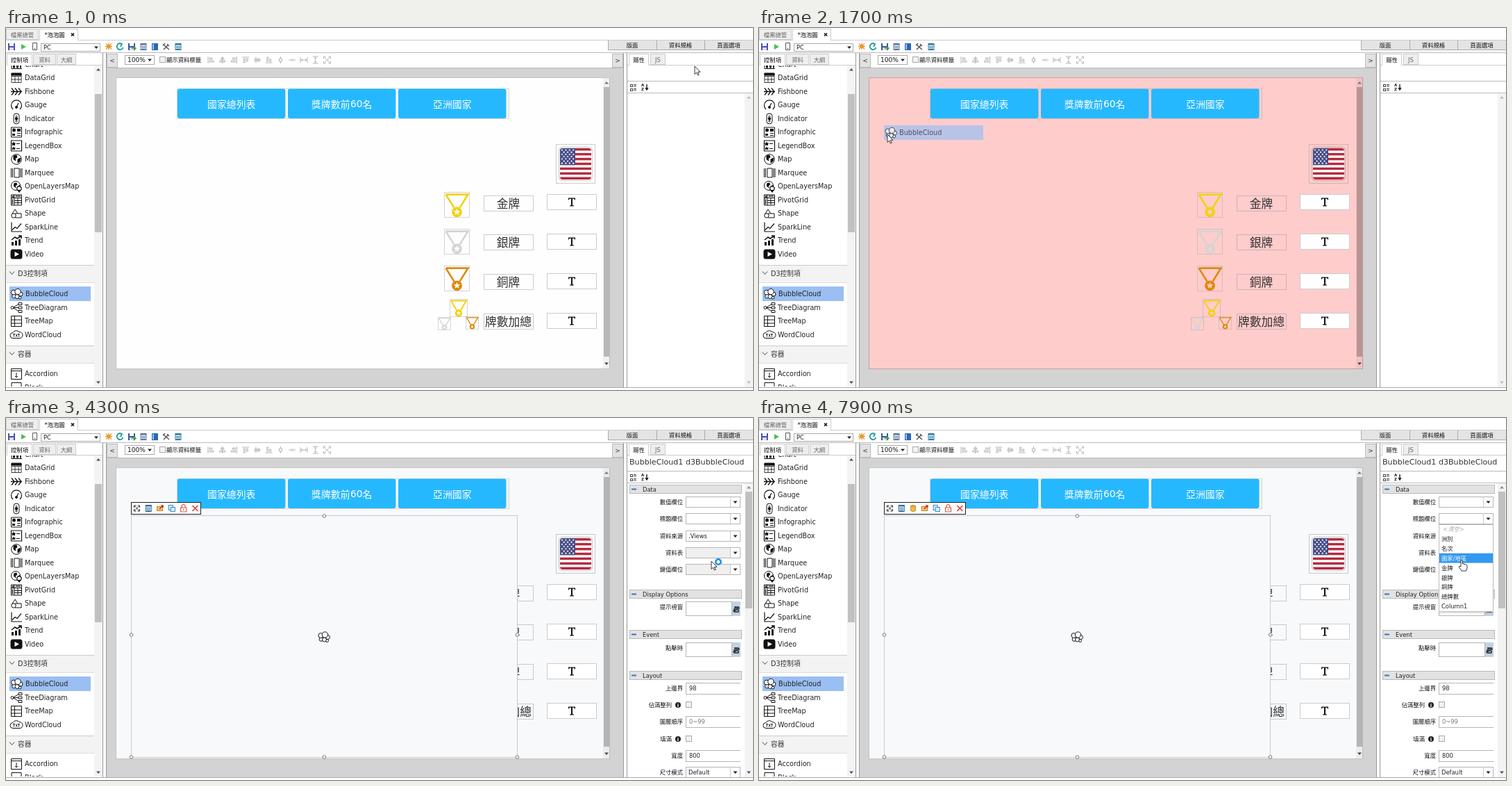
Write an HTML page with a canvas that moves like this. It is 1076x521 px and loops after 8000 ms.

```html
<!DOCTYPE html>
<html lang="zh-Hant">
<head>
<meta charset="utf-8">
<style>
html, body { margin: 0; width: 100%; height: 100%; overflow: hidden; background: #fff; }
canvas { display: block; }
</style>
</head>
<body>
<canvas id="stage" width="1076" height="521"></canvas>
<script>
const c = document.getElementById('stage').getContext('2d');
const LOOP = 8000, STEP = 100, ROW = 13.9;
const SANS = '"DejaVu Sans", "Noto Sans CJK TC", sans-serif';
const CJK = '"Noto Sans CJK TC Light", "Noto Sans CJK TC", "Noto Sans CJK JP", sans-serif';
const PALE = '#f8f9fb';

function rect(x, y, w, h, fill, stroke, dash) {
  if (fill) { c.fillStyle = fill; c.fillRect(x, y, w, h); }
  if (stroke) {
    c.strokeStyle = stroke;
    c.lineWidth = 1;
    c.setLineDash(dash || []);
    c.strokeRect(x + .5, y + .5, w - 1, h - 1);
    c.setLineDash([]);
  }
}
const hline = (x, y, w, col) => rect(x, y, w, 1, col);
const vline = (x, y, h, col) => rect(x, y, 1, h, col);

function text(s, x, y, size = 8.35, col = '#222', align = 'left', font = SANS, weight = 'normal') {
  c.font = `${weight} ${size}px ${font}`;
  c.textAlign = align;
  c.fillStyle = col;
  c.fillText(s, x, y + size * .36);
}

function icon(d, x, y, { col = '#111', fill, lw = 1, k = 1 } = {}) {
  const p = new Path2D(d);
  c.save();
  c.translate(x, y);
  c.scale(k, k);
  if (fill) { c.fillStyle = fill; c.fill(p); }
  if (col) { c.strokeStyle = col; c.lineWidth = lw; c.stroke(p); }
  c.restore();
}

const disc = (x, y, r) => `M${x - r} ${y}a${r} ${r} 0 1 0 ${2 * r} 0a${r} ${r} 0 1 0 ${-2 * r} 0`;
const arrow = (x, y, col = '#222', up = 1) => icon(`M-3 ${-1.5 * up}H3L0 ${2 * up}Z`, x, y, { col: null, fill: col });

function starPath(r) {
  let d = '';
  for (let i = 0; i < 10; i++) {
    const a = i * Math.PI / 5 - Math.PI / 2, q = i % 2 ? r * .42 : r;
    d += (i ? 'L' : 'M') + (q * Math.cos(a)).toFixed(2) + ' ' + (q * Math.sin(a)).toFixed(2);
  }
  return d + 'Z';
}

const GLOBE = 'M-4-5L0-6 1-3-2-1-1 2-4 0ZM2 0L6-2 5 3 2 5Z';
const SOLID = { col: null, fill: '#111' };
const glyphs = {
  Chart: [['M-7-6V6H8'], ['M-5 0h3v5h-3zM0-4h3v9h-3zM5-2h2v7h-2z', SOLID]],
  DataGrid: [['M-7-6.5H7V6.5H-7ZM-7-2.5H7M-7 2H7M-2-2V6M3-2V6', { lw: .8 }], ['M-7-7H7V-4H-7Z', { fill: '#111' }]],
  Fishbone: [['M-8 0H8M-7-5l4 5-4 5M-2-5l4 5-4 5M3-5l4 5-4 5', { lw: 1.3 }]],
  Gauge: [['M-5 6A7.5 7.5 0 1 1 5 6M0 3L3-3', { lw: 1.2 }], [disc(0, 3, 1.5), { fill: '#111' }]],
  Indicator: [['M-4-4A4 3.5 0 0 1 4-4V4A4 3.5 0 0 1-4 4Z'], [disc(0, -3, 1.2) + disc(0, 3.5, 1.2), { lw: .8 }], [disc(0, 0, 1.8), { fill: '#111' }]],
  Infographic: [['M-7.5-7H7.5V7H-7.5Z'], [disc(-3.5, -3, 2.5) + 'M1-5H6V-1H1ZM-6 2H-2V5H-6ZM1 1H6V2H1ZM1 4H6V5H1Z', SOLID]],
  LegendBox: [['M-7.5-7.5H7.5V7.5H-7.5ZM0-3H5M0 4H5', { lw: 1.2 }], ['M-4-6l1 2 2 0-1 2 0 2-2-1-2 1 0-2-1-2 2 0ZM-4 1l1 2 2 0-1 2 0 1-2-1-2 1 0-2-1-1 2 0Z', SOLID]],
  Map: [[disc(0, 0, 7.3)], [GLOBE, { fill: '#111' }]],
  Marquee: [['M-3-6.5H4V6.5H-3ZM-7.5-6.5V6.5M-5.5-6.5V6.5M6-6.5V6.5M8-6.5V6.5']],
  OpenLayersMap: [[disc(-1, -1, 6.5)], [GLOBE, { fill: '#111', k: .85 }], [disc(4, 3, 3.2), { fill: '#fff', lw: 1.3 }], ['M2 5.5L4 8.5 6 5.5Z', { fill: '#111' }]],
  PivotGrid: [['M-7.5-7.5H7.5V7.5H-7.5ZM-7.5-3H7.5M-3-7.5V7.5M-3 1H7M-3 4H7M2-3V7'], ['M-6-6H-4V-4H-6ZM-1-6H6V-5H-1ZM-6-1H-5V6H-6Z', { fill: '#111', lw: .4 }]],
  Shape: [['M-2-6L3 2H-7Z'], ['M-2 0H7V6H-2Z', { fill: '#fff' }], [disc(-4, 3, 3.2), { fill: '#fff' }]],
  SparkLine: [['M-7-7V6.5H8M-6 4L-2 0 1 2 7-5', { lw: 1.2 }]],
  Trend: [['M-7 2h3v5h-3zM-2 0h3v7h-3zM3-2h3v9h-3z', SOLID], ['M-7-1L-2-5 1-3 6-6M3-7H7V-3', { lw: 1.6 }]],
  Video: [['M-6-6.5H6Q8-6.5 8-4V4Q8 6.5 6 6.5H-6Q-8 6.5-8 4V-4Q-8-6.5-6-6.5', { fill: '#111' }], ['M-2.5-3.5L4 0-2.5 3.5Z', { col: null, fill: '#fff' }]],
  BubbleCloud: [
    [disc(-4, 3.5, 2.8), { fill: '#fff' }], [disc(5.5, .5, 3), { fill: '#fff' }], [disc(4.5, 5.5, 2), { fill: '#fff' }],
    [disc(.5, 4, 3), { fill: '#fff' }], [disc(-4.5, -2, 3.5), { fill: '#fff' }], [disc(1.5, -3, 4.2), { fill: '#fff' }]
  ],
  TreeDiagram: [['M-5 0L4-5.5M-5 0H4M-5 0L4 5.5'], [disc(-6, 0, 2) + 'M3-7H8V-4H3ZM3-1.5H8V1.5H3ZM3 4H8V7H3Z', { fill: '#fff' }]],
  TreeMap: [['M-7.5-7.5H7.5V7.5H-7.5ZM-2.5-7.5V7.5M-7.5-2H7.5M-7.5 3H7.5']],
  WordCloud: [['M-5 5A4 4 0 0 1-5-3A5.5 5.5 0 0 1 4-4A4.5 4.5 0 0 1 5 5Z'], ['M-5-1h3m-1.5 0v4M-1-1l2.5 4m0-4l-2.5 4M2-1h3m-1.5 0v4', { lw: .9 }]],
  Accordion: [['M-7.5-7.5H7.5V7.5H-7.5ZM-7.5-4.5H7.5M0-2V5M-2 3L0 5 2 3']],
  Block: [['M-7-7H7V7H-7Z']]
};

function glyph(name, x, y) {
  for (const [d, o] of glyphs[name]) icon(d, x, y, o);
}

function lists(x, y, col) {
  rect(x - 4.5, y - 5, 9, 10, '#fff', col);
  rect(x - 4, y - 4.5, 8, 2, col);
  for (let i = 0; i < 3; i++) hline(x - 3, y - 1 + i * 2, 6, col);
}

function disk(x, y, col) {
  rect(x - 5, y - 5, 10, 10, col);
  rect(x - 3, y - 5, 6, 4, '#fff');
  rect(x - 3, y + 1, 6, 4, '#dde');
}

function tab(s, x, w, y, active, h = 15, mid = x + w / 2) {
  rect(x, y, w, h + (active ? 2 : 1), active ? '#fff' : '#eee', '#ccc');
  if (active) rect(x + 1, y + h - 1, w - 2, 3, '#fff');
  text(s, mid, y + 8.5, 8.35, active ? '#111' : '#666', 'center');
}

function topBar() {
  hline(0, 17, 1076, '#ccc');
  tab('檔案總管', 0, 47, 1, false, 15, 23.5);
  tab('*泡泡圖', 48, 56, 1, true, 15, 70);
  icon('M-2-2L2 2M2-2L-2 2', 96, 9.5, { lw: 1.6 });

  disk(8, 27, '#4a4fb5');
  icon('M-3-4L4 0-3 4Z', 25, 27, { col: null, fill: '#4fbf4f' });
  icon('M-3-5H3V5H-3ZM-1 3H1', 41.5, 26.5, { col: '#555' });
  rect(50, 22, 86, 12, '#fff', '#aaa');
  text('PC', 54, 28);
  arrow(130, 28);
  icon('M-5 0H5M0-5V5M-4-4L4 4M4-4L-4 4', 148, 26.5, { col: '#e59a2c', lw: 1.3 });
  icon(disc(0, 0, 2.8), 148, 26.5, { col: null, fill: '#e59a2c' });
  icon('M3-4A4.5 4.5 0 1 0 4.5 1M-2-5L3-4 1 0', 164, 27, { col: '#159a93', lw: 1.7 });
  disk(181, 27, '#3b579a');
  icon('M-1 2H4M2 0L5 2 2 5', 182, 27, { col: '#39a845', lw: 1.5 });
  lists(198, 27, '#56709a');
  rect(210, 22, 9, 10, '#2c67b5');
  rect(211, 23, 2, 8, '#9cc0ea');
  icon('M-4 4L3-3M-4-3L4 4M1-4L4-1M-5-2L-2-5', 231, 27, { col: '#555', lw: 1.5 });
  lists(248, 27, '#27769f');

  rect(867, 18, 209, 14, '#e4e4e4');
  hline(867, 31, 209, '#aaa');
  for (const x of [867, 937, 1006]) vline(x, 18, 14, '#aaa');
  [['版面', 902], ['資料規格', 971.5], ['頁面選項', 1041]].forEach(([s, x]) =>
    text(s, x, 24.5, 8.35, '#111', 'center', SANS, 500));
  hline(0, 35, 1076, '#bbb');
}

function section(s, y) {
  rect(0, y, 127, 25, '#f3f3f3');
  hline(0, y, 127, '#ccc');
  hline(0, y + 25, 127, '#ddd');
  icon('M-3.5-2L0 2 3.5-2', 8.5, y + 11.5, { col: '#444' });
  text(s, 17, y + 13, 9.7, '#333');
}

function item(s, y) {
  glyph(s, 15, y);
  text(s, 27, y, 9.7);
}

function leftPanel() {
  tab('控制項', 1, 37, 37, true);
  tab('資料', 39, 33, 37, false);
  tab('大綱', 73, 28, 37, false);
  c.save();
  c.beginPath();
  c.rect(0, 54, 140, 462);
  c.clip();
  Object.keys(glyphs).slice(0, 15).forEach((s, i) => item(s, 52.5 + i * 19.5));
  section('D3控制項', 341);
  rect(5, 372, 117, 21, '#9bbff3');
  glyph('BubbleCloud', 15.5, 382.5);
  text('BubbleCloud', 28, 382.5, 9.7);
  ['TreeDiagram', 'TreeMap', 'WordCloud'].forEach((s, i) => item(s, 402.5 + i * 19.5));
  section('容器', 457);
  item('Accordion', 498);
  item('Block', 517.5);
  rect(127, 54, 12, 462, '#f3f3f3');
  rect(128, 95, 10, 199, '#c1c1c1');
  arrow(133, 60, '#555', -1);
  arrow(133, 510, '#555');
  c.restore();
  hline(38, 53, 101, '#ccc');
  vline(139, 36, 481, '#999');
  vline(144, 36, 481, '#999');
}

function alignBar() {
  for (const [x, s] of [[145, '<'], [873, '>']]) {
    rect(x, 37, 16, 20, '#e2e2e2', '#bbb');
    text(s, x + 8, 47, 9, '#333', 'center');
  }
  rect(171, 39, 43, 14, '#fff', '#aaa');
  text('100%', 175, 46, 9, '#111');
  arrow(207, 46);
  rect(221, 41, 9, 9, '#f4f4f4', '#aaa');
  text('顯示資料標籤', 231, 46, 8.35, '#111');
  const marks = ['M-4-5V5M-2-3H2V-1H-2ZM-2 1H4V3H-2Z', 'M0-5V5M-2-3H2V-1H-2ZM-4 1H4V3H-4Z',
    'M4-5V5M-2-3H2V-1H-2ZM-4 1H2V3H-4Z', 'M-5-4H5M-3-2H-1V4H-3ZM1-2H3V2H1Z',
    'M-5 0H5M-3-3H-1V3H-3ZM1-2H3V2H1Z', 'M-5 4H5M-3-4H-1V2H-3ZM1-1H3V2H1Z',
    'M0-5V-2M-2-2H2V2H-2ZM0 2V5', 'M-5 0H-2M-2-2L2 2M2-2L-2 2M2 0H5',
    'M-5-4V4M5-4V4M-4 0H4M-2-2L-4 0-2 2M2-2L4 0 2 2', 'M-4-5H4M-4 5H4M0-4V4M-2-2L0-4 2-2M-2 2L0 4 2 2',
    'M-4-4L4 4M4-4L-4 4M-5-2V-5H-2M2-5H5V-2M5 2V5H2M-2 5H-5V2'];
  marks.forEach((d, i) => icon(d, 295 + i * 16.75, 46, { col: '#b4b4b4' }));
}

function medal(x, y, w, col, bg) {
  rect(x, y, w, w, null, '#aaa', [1, 1]);
  const k = w / 36;
  icon('M2.5 3.5H33.5L22 22M2.5 3.5L14 22', x, y, { col, lw: 2.6, k });
  icon(disc(18, 28, 7.2), x, y, { col: null, fill: col, k });
  icon(starPath(5), x + 18 * k, y + 28 * k, { col: null, fill: bg, k });
}

function flag() {
  rect(792, 167, 57, 57, null, '#999', [1, 1]);
  c.save();
  c.beginPath();
  c.roundRect(796.5, 171.5, 48, 48, 5);
  c.strokeStyle = 'rgba(0,0,0,.16)';
  c.lineWidth = 1.5;
  c.stroke();
  c.beginPath();
  c.roundRect(798, 173, 45, 45, 4);
  c.clip();
  rect(798, 173, 45, 45, '#fff');
  const h = 45 / 13;
  for (let i = 0; i < 13; i += 2) rect(798, 173 + i * h, 45, h, '#b52a3e');
  rect(798, 173, 22, 7 * h, '#474d85');
  for (let j = 0; j < 7; j++)
    for (let i = 0; i < 4 - j % 2; i++)
      icon(starPath(1.7), 801 + i * 5.4 + j % 2 * 2.7, 175.5 + j * 3.2, { col: null, fill: '#fff' });
  c.restore();
}

function board(bg, frame) {
  rect(145, 57, 745, 460, '#d3d3d3');
  hline(145, 57, 745, '#bbb');
  rect(158, 71, 712, 420, bg, frame);
  rect(860, 72, 10, 418, 'rgba(0,0,0,.05)');
  rect(861, 85, 8, 388, 'rgba(0,0,0,.24)');
  arrow(865, 79, '#777', -1);
  arrow(865, 483, '#444');

  rect(246, 87, 479, 44, null, '#aaa', [1, 1]);
  c.fillStyle = '#26b8ff';
  for (const x of [247, 406, 565]) {
    c.beginPath();
    c.roundRect(x, 87.5, 155.5, 42.5, 3);
    c.fill();
  }
  const label = (s, x) => text(s, x, 109.5, 13.9, '#fff', 'left', CJK, 300);
  label('國家總列表', 290);
  label('獎牌數前', 440);
  text('60', 496, 109, 13.9, '#fff');
  label('名', 513.5);
  label('亞洲國家', 615);

  flag();
  const gold = '#f2d20c', silver = '#d4d4d4', bronze = '#dc8a0c';
  [gold, silver, bronze].forEach((col, i) => medal(631, 236 + i * 53, 37, col, bg));
  medal(639, 390, 26, gold, bg);
  medal(622, 416, 19, silver, bg);
  medal(662, 415, 19, bronze, bg);
  ['金牌', '銀牌', '銅牌', '牌數加總'].forEach((s, i) => {
    const y = Math.round(240.6 + i * 56.7), ty = Math.round(239.4 + i * 56.8);
    rect(688, y, 72, 23, null, '#999', [1, 1]);
    text(s, 723.5, y + 12, 16.8, '#333', 'center', CJK, 300);
    rect(779, ty, 72, 23, '#fff', '#999', [1, 1]);
    icon('M-5-6H5V-3H4.2L3.4-4.8H1V4.6L3 5.2V6H-3V5.2L-1 4.6V-4.8H-3.4L-4.2-3H-5Z', 815, ty + 11.5, SOLID);
  });
}

const tools = {
  move: (x, y) => icon('M-4-4L4 4M4-4L-4 4M-4-1V-4H-1M1-4H4V-1M4 1V4H1M-1 4H-4V1', x, y, { col: '#333' }),
  list: (x, y) => lists(x, y, '#2d6fa3'),
  db: (x, y) => {
    icon('M-3.5-3.5V3.5Q0 6 3.5 3.5V-3.5Q0-6-3.5-3.5Z', x, y, { col: '#c9912a', fill: '#f0b94a' });
    icon('M-3.5-3.5Q0-1.5 3.5-3.5', x, y, { col: '#c9912a' });
  },
  edit: (x, y) => {
    rect(x - 5, y - 3, 9, 7, '#f3c56d', '#b9852f');
    icon('M-1 1L4-4M1-4H4V-1', x, y, { col: '#d0342c', lw: 1.6 });
  },
  copy: (x, y) => {
    rect(x - 5, y - 5, 7, 8, '#dff0fb', '#2b8cc9');
    rect(x - 2, y - 2, 7, 7, '#dff0fb', '#2b8cc9');
  },
  lock: (x, y) => icon('M-4-1H4V5H-4ZM-2.5-1V-3A2.5 2.5 0 0 1 2.5-3V-1M0 1V3', x, y, { col: '#e0553f', lw: 1.2 }),
  close: (x, y) => icon('M-4-4L4 4M4-4L-4 4', x, y, { col: '#df3a2b', lw: 1.6 })
};

function widget(bottom, hasData) {
  rect(180, 140, 557, bottom - 139, PALE, '#999', [1, 1]);
  const mid = Math.round(bottom / 2 + 68);
  for (const [x, y] of [[458.5, 141], [180.5, mid], [736.5, mid], [180.5, bottom], [458.5, bottom], [736.5, bottom]])
    icon(disc(0, 0, 2.3), x, y, { col: '#777', fill: '#fff' });
  glyph('BubbleCloud', 458, 315);
  const names = Object.keys(tools).filter(n => n !== 'db' || hasData);
  rect(180, 121, Math.round(names.length * 16.8 + .5), 18, '#fff', '#222');
  names.forEach((n, i) => tools[n](188.5 + i * 16.8, 130));
}

function combo(name, y, value = '', bg = '#fff') {
  text(name, 975, y, 8.35, '#111', 'right');
  rect(979, y - 8, 79, 16, bg, '#b5b5b5');
  vline(1043, y - 7, 14, '#ccc');
  rect(1044, y - 7, 13, 14, '#fff');
  arrow(1050.5, y);
  text(value, 983, y);
}

function field(name, y, value, col) {
  text(name, 975, y, 8.35, '#111', 'right');
  rect(979, y - 8, 79, 16, '#fff');
  hline(979, y - 8, 79, '#b5b5b5');
  hline(979, y + 8, 79, '#b5b5b5');
  vline(979, y - 8, 16, '#b5b5b5');
  text(value, 984, y, 8.35, col);
}

function check(name, y) {
  text(name, 959, y, 8.35, '#111', 'right');
  icon(disc(0, 0, 4), 968, y, { col: null, fill: '#222' });
  text('i', 968, y, 7, '#fff', 'center', SANS, 'bold');
  rect(979, y - 5, 9, 9, '#f0f0f0', '#aaa');
}

function script(name, y) {
  text(name, 975, y, 8.35, '#111', 'right');
  rect(979, y - 8, 67, 21, '#fff', '#b5b5b5');
  rect(1046, y - 8, 12, 21, '#c3d2e4');
  icon('M-3-3H3Q4-3 4-1H1Q-4-2-3 1H2Q4 1 3 4H-3Q-4 4-4 2H-1', 1052, y + 3, { col: '#222', lw: 1.3 });
}

function group(name, y) {
  rect(898, y, 162, 13, '#e2e2e2', '#b9b9b9');
  rect(901, y + 5.5, 7, 2, '#3f74c4');
  text(name, 917, y + 6.5);
}

function properties(t) {
  text('BubbleCloud1 d3BubbleCloud', 898, 63, 11.1, '#333');
  c.save();
  c.beginPath();
  c.rect(895, 94, 181, 423);
  c.clip();
  const dim = t < 3600 ? '#fff' : t < 5300 ? '#efefef' : t < 6500 ? '#f5f5f5' : '#fff';
  group('Data', 96);
  combo('數值欄位', 121);
  combo('標題欄位', 145);
  combo('資料來源', 170, t >= 3600 ? '.Views' : '');
  combo('資料表', 194, t >= 5100 ? 'Union1' : '', dim);
  combo('鍵值欄位', 218, t >= 6700 ? '國家/地區' : '', dim);
  group('Display Options', 247);
  script('提示視窗', 272);
  group('Event', 305);
  script('點擊時', 331);
  group('Layout', 364);
  field('上邊界', 389, '98');
  check('佔滿整列', 413);
  field('圖層順序', 437, '0~99', '#777');
  check('填滿', 462);
  field('寬度', 486, '800');
  combo('尺寸模式', 510, 'Default');
  c.restore();
}

function rightPanel(t) {
  rect(890, 36, 186, 481, '#fff');
  vline(889, 36, 481, '#999');
  vline(894, 36, 481, '#999');
  hline(895, 53, 181, '#ccc');
  tab('屬性', 897, 29, 37, true);
  tab('JS', 928, 22, 37, false);
  hline(895, 76, 181, '#bbb');
  hline(895, 93, 181, '#bbb');
  for (const y of [81, 87]) {
    rect(899, y, 4, 4, '#fff', '#444');
    hline(904, y, 4, '#444');
    hline(904, y + 2, 4, '#444');
  }
  text('A', 915, 82.5, 5.5, '#222', 'left', SANS, 'bold');
  text('Z', 915, 88, 5.5, '#222', 'left', SANS, 'bold');
  icon('M0-4V3M-2 1L0 4 2 1', 923, 85, { lw: 1.3 });
  const shown = t >= 2000;
  rect(1064, 94, 12, 423, '#f3f3f3');
  if (shown) rect(1065, 106, 10, 168, '#c1c1c1');
  arrow(1070, 100, shown ? '#888' : '#bbb', -1);
  arrow(1070, 510, shown ? '#555' : '#bbb');
  if (shown) properties(t);
}

const columns = ['<清空>', '洲別', '名次', '國家/地區', '金牌', '銀牌', '銅牌', '總牌數', 'Column1'];
const menus = [
  { from: 3200, to: 3600, y: 170, items: ['<清空>', '.Views', '.Tables', '.Files'] },
  { from: 4600, to: 4900, y: 194, items: ['<清空>', 'Table1', 'Table2', 'Union1'] },
  { from: 5600, to: 6700, y: 218, items: columns },
  { from: 7700, to: LOOP, y: 145, items: columns }
];

// Returns true while an entry is hovered.
function menu({ y, items }, py) {
  const top = y + 8, h = items.length * ROW + 1;
  const over = Math.floor((py - top) / ROW);
  rect(980, top + 2, 78, h, 'rgba(0,0,0,.12)');
  rect(979, top, 79, h, '#fff', '#bbb');
  items.forEach((s, i) => {
    const cy = top + 7 + i * ROW;
    if (i === over) rect(980, cy - 7, 77, ROW, '#3399f0');
    const col = i === over ? '#fff' : i ? '#222' : '#aaa';
    text(s, i ? 983 : 985, cy, 8.35, col, 'left', SANS, i ? 'normal' : 'italic');
  });
  return over >= 0 && over < items.length;
}

// Pointer stops: time, x, y.
const path = [
  [0, 992, 55], [100, 900, 100], [300, 420, 280], [500, 86, 379], [600, 84, 380],
  [800, 193, 304], [900, 259, 206], [1100, 215, 172], [1400, 190, 157], [1600, 185, 153], [1700, 185, 153],
  [1800, 217, 160], [2100, 480, 205], [2600, 886, 231], [2700, 940, 218], [3000, 1046, 166],
  [3200, 1044, 168], [3300, 1010, 194], [3600, 1010, 194], [4300, 1016, 206], [4500, 1012, 190],
  [4600, 1010, 192], [4800, 1000, 251], [5200, 1000, 251], [5400, 1001, 222], [5500, 1001, 219],
  [5600, 1001, 219], [6000, 1007, 290], [6400, 1009, 272], [6600, 1009, 272], [7300, 1000, 160],
  [7500, 1000, 150], [7600, 1000, 150], [7900, 1012, 204]
];

function pointer(t) {
  const i = path.findIndex(p => p[0] > t);
  if (i < 0) return path[path.length - 1].slice(1);
  const [t0, x0, y0] = path[i - 1], [t1, x1, y1] = path[i];
  const k = (t - t0) / (t1 - t0);
  return [x0 + (x1 - x0) * k, y0 + (y1 - y0) * k];
}

function cursor(x, y, hand, busy) {
  const o = { col: '#222', fill: '#fff', lw: .9 };
  if (hand) icon('M-1 1Q0-.5 1.3 1V6Q3 5 4 6.5 6 6 6.5 7.5 8 7.5 8 9V12L6.5 16H0L-4 10Q-4 8.5-1 10Z', x, y, o);
  else icon('M0 0V11.5L2.7 9 4.4 13 6.2 12.2 4.5 8.3H8Z', x, y, o);
  if (busy) icon(disc(0, 0, 3.7), x + 10, y + 1, { col: '#1e90e6', lw: 2.6 });
}

// The dragged item trails the pointer by one step.
function ghost(t) {
  const [px, py] = pointer(t - STEP);
  const x = Math.round(px - 5), y = Math.round(py - 13);
  c.save();
  c.globalAlpha = .7;
  rect(x, y, 143, 21, '#9bbff3');
  glyph('BubbleCloud', x + 10, y + 10.5);
  text('BubbleCloud', x + 22, y + 10.5, 9.7);
  c.restore();
}

function draw(t) {
  rect(0, 0, 1076, 521, '#fff');
  const dragging = t >= 700 && t < 1800, dropped = t >= 1800;
  board(dragging ? '#ffcccc' : dropped ? PALE : '#fefefe', dragging ? '#c9a0a0' : '#c4c4c4');
  if (dropped) widget(t < 3600 ? 489 : 488, t >= 5300);
  topBar();
  leftPanel();
  alignBar();
  rightPanel(t);
  hline(0, 517, 1076, '#aaa');
  if (dragging) ghost(t);
  const [x, y] = pointer(t);
  const open = menus.find(m => t >= m.from && t < m.to);
  const hand = open ? menu(open, y) : false;
  cursor(x, y, hand, t >= 3700 && t < 4500);
}

const start = performance.now();
let last = -1;
function tick() {
  const t = Math.floor((performance.now() - start) % LOOP / STEP) * STEP;
  if (t !== last) draw(last = t);
  requestAnimationFrame(tick);
}
tick();
</script>
</body>
</html>
```
